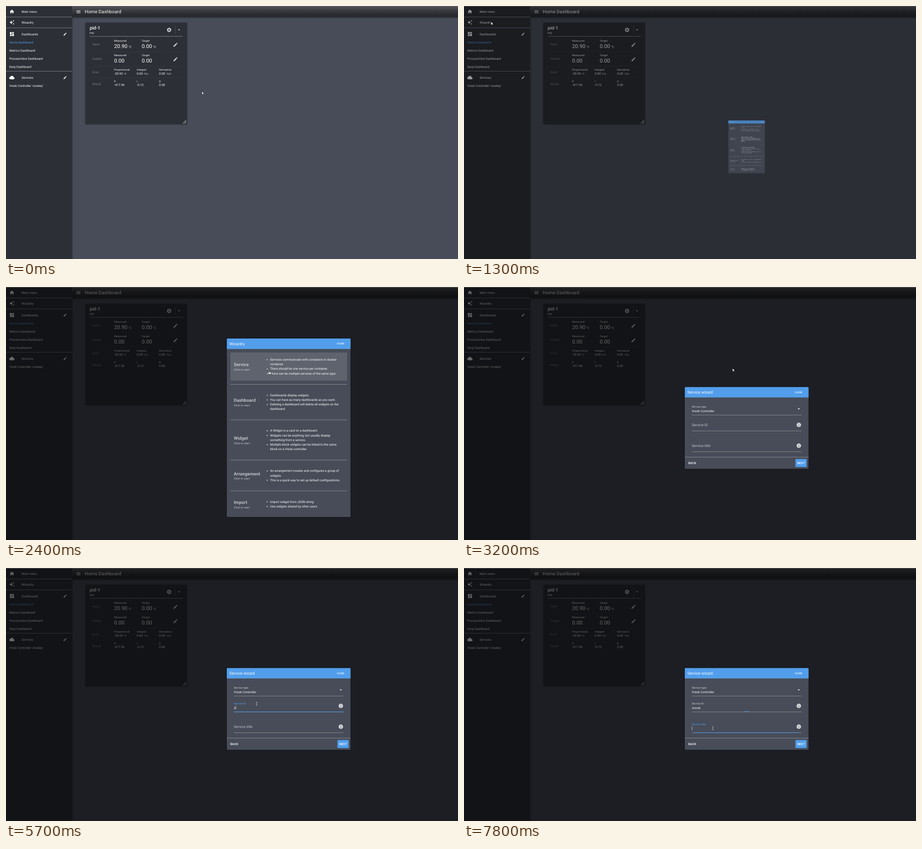
An HTML page that plays this animation: 999x560 px, repeating every 8000 ms.

```html
<!DOCTYPE html>
<html lang="en">
<head>
<meta charset="utf-8">
<title>Service wizard</title>
<style>
html, body { margin: 0; width: 100%; height: 100%; overflow: hidden; background: #474c58; }
svg { display: block; width: 999px; height: 560px; }
text { font: 6.82px Roboto, sans-serif; fill: #fff; text-rendering: geometricPrecision; white-space: pre; }
.cap { font-size: 5.84px; letter-spacing: .033em; }
.unit { font-size: 5.3px; }
.big { font-size: 11.69px; }
.bar { font-size: 10.23px; letter-spacing: .01em; }
.name { font-size: 10.23px; font-weight: 500; }
.row { fill: #7c7f86; }
.head { font-size: 8.77px; }
.btn { font-weight: 500; }
.close { font-size: 5.4px; font-weight: 500; }
.opt { font-size: 9.74px; font-weight: 500; letter-spacing: .0125em; fill: #d3d5d8; }
.sub { fill: #d3d5d8; }
.val { letter-spacing: .0094em; }
.lab { font-size: 5.84px; letter-spacing: .0094em; fill: #d0d2d6; }
.blue { fill: #529eeb; }
.icon { fill: #fff; }
.soft { fill: #d3d5d8; }
.line { stroke: #a3a6ac; stroke-width: .7; fill: none; }
.faint { stroke: #3b3e45; stroke-width: .6; }
.shadow { filter: drop-shadow(0 .8px 1.5px rgba(0, 0, 0, .45)); }

/* all timelines share one 8 s loop with hard steps */
.t { animation: 8s step-end infinite; }
#hover { animation-name: hover; }
#dim { animation-name: dim; }
#wizard { animation-name: wizard; transform-origin: 624.5px 311.5px; }
#pick { animation-name: pick; }
#form { animation-name: form; }
#typeLine { animation-name: typeLine; }
#idLine { animation-name: idLine; }
#idLabel { animation-name: idLabel; }
#titleLabel { animation-name: titleLabel; }
#idBar, #titleBar { transform-origin: 624.7px 0; }
#idBar { animation-name: idBar; }
#titleBar { animation-name: titleBar; }
#k1 { animation-name: k1; }
#k2 { animation-name: k2; }
#k3 { animation-name: k3; }
#caret { animation-name: caret; }
#pointer { animation-name: move; }
#arrow { animation-name: arrow; }
#hand { animation-name: hand; }
#beam { animation-name: beam; }

@keyframes hover { 0% { opacity: 0 } 15% { opacity: 1 } 16.25%, 100% { opacity: 0 } }
@keyframes dim {
  0% { opacity: 0 } 15% { opacity: .13 } 16.25% { opacity: .4 }
  17.5% { opacity: .55 } 18.75%, 100% { opacity: .6 }
}
@keyframes wizard {
  0% { opacity: 0; transform: scale(0) }
  16.25% { opacity: .76; transform: scale(.296) }
  17.5% { opacity: .95; transform: scale(.79) }
  18.75% { opacity: 1; transform: scale(.975) }
  20% { opacity: 1; transform: none }
  40%, 100% { opacity: 0; transform: none }
}
@keyframes pick { 0% { opacity: 0 } 18.75%, 100% { opacity: 1 } }
@keyframes form { 0% { opacity: 0 } 40%, 100% { opacity: 1 } }
@keyframes typeLine { 0% { stroke: #a3a6ac } 47.5% { stroke: #fff } 52.5%, 100% { stroke: #a3a6ac } }
@keyframes idLine { 0% { stroke: #a3a6ac } 52.5% { stroke: #fff } 97.5%, 100% { stroke: #a3a6ac } }
@keyframes idLabel {
  0% { font-size: 7.79px; transform: translateY(5.6px); fill: #c6c8cd }
  57.5% { font-size: 5.84px; transform: none; fill: #529eeb }
  97.5%, 100% { font-size: 5.84px; transform: none; fill: #d0d2d6 }
}
@keyframes titleLabel {
  0% { font-size: 7.79px; transform: translateY(5.6px); fill: #c6c8cd }
  97.5%, 100% { font-size: 5.84px; transform: none; fill: #529eeb }
}
@keyframes idBar {
  0% { transform: scaleX(0) } 57.5% { transform: scaleX(.955) }
  61.25% { transform: none } 97.5%, 100% { transform: scaleX(.047) }
}
@keyframes titleBar { 0% { transform: scaleX(0) } 97.5%, 100% { transform: scaleX(.955) } }
@keyframes k1 { 0% { fill: transparent } 71.25%, 100% { fill: #fff } }
@keyframes k2 { 0% { fill: transparent } 76.25%, 100% { fill: #fff } }
@keyframes k3 { 0% { fill: transparent } 80%, 100% { fill: #fff } }
@keyframes caret {
  0% { opacity: 0 }
  57.5% { opacity: 1; transform: none }
  71.25% { opacity: 1; transform: translateX(3.8px) }
  76.25% { opacity: 1; transform: translateX(11.6px) }
  80% { opacity: 1; transform: translateX(18.8px) }
  88.75% { opacity: 0 }
  97.5%, 100% { opacity: 1; transform: translateY(45.9px) }
}
@keyframes move {
  0% { transform: translate(433px, 189px) }
  3.75% { transform: translate(418px, 184px) }
  5% { transform: translate(350px, 158px) }
  6.25% { transform: translate(235px, 110px) }
  7.5% { transform: translate(130px, 66px) }
  8.75% { transform: translate(75px, 41px) }
  10% { transform: translate(60px, 35px) }
  20% { transform: translate(72px, 42px) }
  21.25% { transform: translate(115px, 62px) }
  22.5% { transform: translate(190px, 94px) }
  23.75% { transform: translate(280px, 128px) }
  25% { transform: translate(365px, 155px) }
  26.25% { transform: translate(445px, 172px) }
  27.5% { transform: translate(522px, 181px) }
  28.75% { transform: translate(566px, 184px) }
  30% { transform: translate(580px, 184px) }
  40% { transform: translate(593.5px, 180px) }
  47.5% { transform: translate(560px, 286px) }
  52.5% { transform: translate(554px, 300.5px) }
  88.75% { transform: translate(554px, 344.5px) }
  97.5%, 100% { transform: translate(550px, 354.5px) }
}
@keyframes arrow { 0% { opacity: 1 } 27.5% { opacity: 0 } 40% { opacity: 1 } 47.5%, 100% { opacity: 0 } }
@keyframes hand { 0% { opacity: 0 } 27.5% { opacity: 1 } 40% { opacity: 0 } 47.5% { opacity: 1 } 52.5%, 100% { opacity: 0 } }
@keyframes beam { 0% { opacity: 0 } 52.5%, 100% { opacity: 1 } }
</style>
</head>
<body>
<svg viewBox="0 0 999 560">
<defs>
  <linearGradient id="top" x2="0" y2="1">
    <stop offset="0" stop-color="#55575b"/><stop offset=".45" stop-color="#36383d"/><stop offset=".8" stop-color="#282a2f"/>
  </linearGradient>
  <linearGradient id="fall" x2="0" y2="1"><stop stop-opacity=".25"/><stop offset="1" stop-opacity="0"/></linearGradient>
  <linearGradient id="side"><stop stop-opacity=".2"/><stop offset="1" stop-opacity="0"/></linearGradient>
  <path id="edit" d="M3 17.25V21h3.75L17.81 9.94l-3.75-3.75zM20.71 7.04c.39-.39.39-1.02 0-1.41l-2.34-2.34c-.39-.39-1.02-.39-1.41 0l-1.83 1.83 3.75 3.75z"/>
  <path id="drop" d="M-2.5-1.2h5L0 1.3z"/>
  <circle id="dot" r="1.05" fill="#fff"/>
  <g id="info">
    <circle r="4.9" fill="#d3d5d8"/>
    <path d="M-.5-.5h1v3h-1zM-.5-2.5h1v1h-1z" fill="#474c58"/>
  </g>
  <path id="ibeam" d="M-1.7-3.8Q0-3.8 0-2.9V2.9Q0 3.8-1.7 3.8M1.7-3.8Q0-3.8 0-2.9M0 2.9Q0 3.8 1.7 3.8" fill="none"/>
</defs>

<rect width="999" height="560" fill="#474c58"/>
<rect x="146" y="25" width="853" height="4" fill="url(#fall)"/>
<rect x="146" y="25" width="4" height="535" fill="url(#side)"/>
<rect x="146" width="853" height="25" fill="url(#top)"/>
<rect width="146" height="560" fill="#2c2f36"/>

<!-- sidebar -->
<rect id="hover" class="t" y="24.3" width="146" height="24" fill="#fff" fill-opacity=".13"/>
<path class="line" d="M0 24.3H146M0 48.3H146M0 144.4H146"/>
<g class="icon">
  <path transform="translate(7.2 6.6) scale(.487)" d="M10 20v-6h4v6h5v-8h3L12 3 2 12h3v8z"/>
  <path transform="translate(7.2 30.4) scale(.487)" d="M19 9l1.25-2.75L23 5l-2.75-1.25L19 1l-1.25 2.75L15 5l2.75 1.25zM11.5 9.5L9 4 6.5 9.5 1 12l5.5 2.5L9 20l2.5-5.5L17 12zM19 15l-1.25 2.75L15 19l2.75 1.25L19 23l1.25-2.75L23 19l-2.75-1.25z"/>
  <path transform="translate(7.2 56.2) scale(.487)" d="M3 13h8V3H3zM3 21h8v-6H3zM13 21h8V11h-8zM13 3v6h8V3z"/>
  <path transform="translate(7.2 152.5) scale(.487)" d="M19.35 10.04C18.67 6.59 15.64 4 12 4 9.11 4 6.6 5.64 5.35 8.04 2.34 8.36 0 10.91 0 14c0 3.31 2.69 6 6 6h13c2.76 0 5-2.24 5-5 0-2.64-2.05-4.78-4.65-4.96z"/>
  <use href="#edit" transform="translate(126.2 57.8) scale(.365)"/>
  <use href="#edit" transform="translate(126.2 154) scale(.365)"/>
  <path transform="translate(154.3 7.1) scale(.487)" d="M3 18h18v-2H3zM3 13h18v-2H3zM3 6v2h18V6z"/>
</g>
<text x="34.5" y="14.9">Main menu</text>
<text x="34.5" y="38.7">Wizardry</text>
<text x="34.5" y="64.5">Dashboards</text>
<text x="7.2" y="83.1" class="blue">Home Dashboard</text>
<text x="7.2" y="101.2">Metrics Dashboard</text>
<text x="7.2" y="119.2">ProcessView Dashboard</text>
<text x="7.2" y="137.2">Derp Dashboard</text>
<text x="34.5" y="160.8">Services</text>
<text x="7.2" y="179.2">Vresk Controller 'vreskey'</text>
<text x="174" y="16.4" class="bar">Home Dashboard</text>

<!-- PID card -->
<rect class="shadow" x="175.5" y="37.2" width="224.5" height="224.6" rx="1.5" fill="#2c2f36"/>
<text x="185" y="52" class="name">pid-1</text>
<text x="185" y="61.7" class="cap">PID</text>
<g transform="translate(360.5 52.9)" fill="none" class="gear" stroke="#d3d5d8">
  <circle r="2.9" stroke-width="2.1"/>
  <circle r="4" stroke-width="1.9" stroke-dasharray="2.3 1.889" stroke-dashoffset="1.15" transform="rotate(30)"/>
</g>
<path d="M374.5 44V61.5" stroke="#5a5d64" stroke-width=".7"/>
<use href="#drop" x="382.5" y="53" class="soft"/>
<path class="line" d="M185 67.2H390.3"/>
<path class="faint" d="M191 101H384M191 133.2H384M191 159H384"/>
<g class="soft">
  <use href="#edit" transform="translate(368.8 79.9) scale(.487)"/>
  <use href="#edit" transform="translate(368.8 112) scale(.487)"/>
</g>
<text x="191" y="87.3" class="row">Input</text>
<text x="239" y="79.1" class="cap">Measured</text>
<text x="300" y="79.1" class="cap">Target</text>
<text x="239" y="92.5" class="big">20.90</text><text x="270.3" y="92.5">°C</text>
<text x="300" y="92.5" class="big">0.00</text><text x="324.7" y="92.5">°C</text>
<text x="191" y="119.4" class="row">Output</text>
<text x="239" y="111.2" class="cap">Measured</text>
<text x="300" y="111.2" class="cap">Target</text>
<text x="239" y="124.7" class="big">0.00</text>
<text x="300" y="124.7" class="big">0.00</text>
<text x="191" y="149.2" class="row">Error</text>
<text x="239" y="143.3" class="cap">Proportional</text>
<text x="289" y="143.3" class="cap">Integral</text>
<text x="338.3" y="143.3" class="cap">Derivative</text>
<text x="239" y="152">-20.90</text><text x="260.5" y="152" class="unit">°C</text>
<text x="289" y="152">0.00</text><text x="304.3" y="152" class="unit">°C·h</text>
<text x="338.3" y="152">0.00</text><text x="354.2" y="152" class="unit">°C/h</text>
<text x="191" y="174.5" class="row">Result</text>
<text x="239" y="168.8" class="cap">P</text>
<text x="289" y="168.8" class="cap">I</text>
<text x="338.3" y="168.8" class="cap">D</text>
<text x="239" y="177.4">-417.96</text>
<text x="289" y="177.4">-0.12</text>
<text x="338.3" y="177.4">0.00</text>
<path d="M397 252.8v8M394.3 255.6v5M391.6 258.4v2" stroke="#fff" stroke-width="1.4" stroke-dasharray="1.4"/>

<rect id="dim" class="t" width="999" height="560"/>
<rect width="999" height="1" fill="#5c5d60"/>

<!-- wizard menu -->
<g id="wizard" class="t">
  <rect class="shadow" x="488" y="114" width="273.5" height="395" rx="1.5" fill="#474c58"/>
  <path d="M488 137.2V115.5q0-1.5 1.5-1.5H760q1.5 0 1.5 1.5V137.2z" class="blue"/>
  <text x="493.7" y="129" class="head">Wizardry</text>
  <text x="731.3" y="127.2" class="close">CLOSE</text>
  <rect id="pick" class="t" x="496" y="145" width="258" height="62.4" fill="#fff" fill-opacity=".13"/>
  <path class="line" d="M496 215.5H754M496 294H754M496 383H754M496 451.2H754"/>
  <text x="503.5" y="175.4" class="opt">Service</text><text x="503.5" y="185.2" class="cap sub">Click to start</text>
  <text x="503.5" y="254.2" class="opt">Dashboard</text><text x="503.5" y="264" class="cap sub">Click to start</text>
  <text x="503.5" y="338.2" class="opt">Widget</text><text x="503.5" y="348" class="cap sub">Click to start</text>
  <text x="503.5" y="416.6" class="opt">Arrangement</text><text x="503.5" y="426.4" class="cap sub">Click to start</text>
  <text x="503.5" y="479.7" class="opt">Import</text><text x="503.5" y="489.5" class="cap sub">Click to start</text>
  <use href="#dot" x="577.5" y="161"/><use href="#dot" x="577.5" y="181.5"/><use href="#dot" x="577.5" y="191.7"/>
  <text y="163">
    <tspan x="583.8">Services communicate with containers in docker-</tspan>
    <tspan x="583.8" dy="10.23">compose.</tspan>
    <tspan x="583.8" dy="10.23">There should be one service per container.</tspan>
    <tspan x="583.8" dy="10.23">There can be multiple services of the same type.</tspan>
  </text>
  <use href="#dot" x="577.5" y="239.8"/><use href="#dot" x="577.5" y="250"/><use href="#dot" x="577.5" y="260.3"/>
  <text y="241.8">
    <tspan x="583.8">Dashboards display widgets.</tspan>
    <tspan x="583.8" dy="10.23">You can have as many dashboards as you want.</tspan>
    <tspan x="583.8" dy="10.23">Deleting a dashboard will delete all widgets on the</tspan>
    <tspan x="583.8" dy="10.23">dashboard.</tspan>
  </text>
  <use href="#dot" x="577.5" y="318.4"/><use href="#dot" x="577.5" y="328.6"/><use href="#dot" x="577.5" y="349.1"/>
  <text y="320.4">
    <tspan x="583.8">A Widget is a card on a dashboard.</tspan>
    <tspan x="583.8" dy="10.23">Widgets can be anything, but usually display</tspan>
    <tspan x="583.8" dy="10.23">something from a service.</tspan>
    <tspan x="583.8" dy="10.23">Multiple block widgets can be linked to the same</tspan>
    <tspan x="583.8" dy="10.23">block on a Vresk controller.</tspan>
  </text>
  <use href="#dot" x="577.5" y="407.3"/><use href="#dot" x="577.5" y="427.8"/>
  <text y="409.3">
    <tspan x="583.8">An arrangement creates and configures a group of</tspan>
    <tspan x="583.8" dy="10.23">widgets.</tspan>
    <tspan x="583.8" dy="10.23">This is a quick way to set up default configurations.</tspan>
  </text>
  <use href="#dot" x="577.5" y="475.7"/><use href="#dot" x="577.5" y="485.9"/>
  <text y="477.7">
    <tspan x="583.8">Import widget from JSON string</tspan>
    <tspan x="583.8" dy="10.23">Use widgets shared by other users</tspan>
  </text>
</g>

<!-- service form -->
<g id="form" class="t">
  <rect class="shadow" x="488" y="221.4" width="273.5" height="181" rx="1.5" fill="#474c58"/>
  <path d="M488 244.6V222.9q0-1.5 1.5-1.5H760q1.5 0 1.5 1.5V244.6z" class="blue"/>
  <text x="493.7" y="236" class="head">Service wizard</text>
  <text x="731.3" y="234.5" class="close">CLOSE</text>
  <path class="line" d="M488 376.6H761.5"/>
  <path id="typeLine" class="line t" d="M503.5 283.4H746"/>
  <path id="idLine" class="line t" d="M503.5 318.6H746"/>
  <path class="line" d="M503.5 364.6H746"/>
  <rect id="idBar" class="blue t" x="503.5" y="317.9" width="242.5" height="1.1"/>
  <rect id="titleBar" class="blue t" x="503.5" y="363.9" width="242.5" height="1.1"/>
  <text x="503.6" y="266.9" class="lab">Service type</text>
  <text x="503.6" y="276.8" class="val">Vresk Controller</text>
  <text id="idLabel" x="503.6" y="302" class="lab t">Service ID</text>
  <text id="titleLabel" x="503.6" y="348" class="lab t">Service title</text>
  <text x="503.6" y="311.8" class="val"><tspan id="k1" class="t">s</tspan><tspan id="k2" class="t">no</tspan><tspan id="k3" class="t">ub</tspan></text>
  <rect id="caret" class="t" x="503.6" y="305.1" width=".7" height="8" fill="#fff"/>
  <use href="#drop" x="740" y="270" class="icon"/>
  <use href="#info" x="740" y="305.2"/>
  <use href="#info" x="740" y="351.2"/>
  <text x="495.8" y="392.1" class="btn">BACK</text>
  <rect class="blue" x="732.5" y="380.7" width="25" height="17.8" rx="1.4"/>
  <text x="736.4" y="392.1" class="btn">NEXT</text>
</g>

<g id="pointer" class="t">
  <path id="arrow" class="t" d="M0 0V6.9L1.5 5.5 2.6 8 3.8 7.5 2.8 5H4.9z" fill="#fff" stroke="#111" stroke-width=".6"/>
  <path id="hand" class="t" d="M0 .7A.8.8 0 0 1 1.6 .7V4L5.2 4.8Q6.2 5.1 6 6.2L5.5 9.4H1.3L-1.8 6.2Q-1.4 5.2 0 6z" fill="#d9dadc" stroke="#111" stroke-width=".6"/>
  <g id="beam" class="t">
    <use href="#ibeam" stroke="#15171b" stroke-width="1.9"/>
    <use href="#ibeam" stroke="#fff" stroke-width=".9"/>
  </g>
</g>
</svg>
</body>
</html>
```
